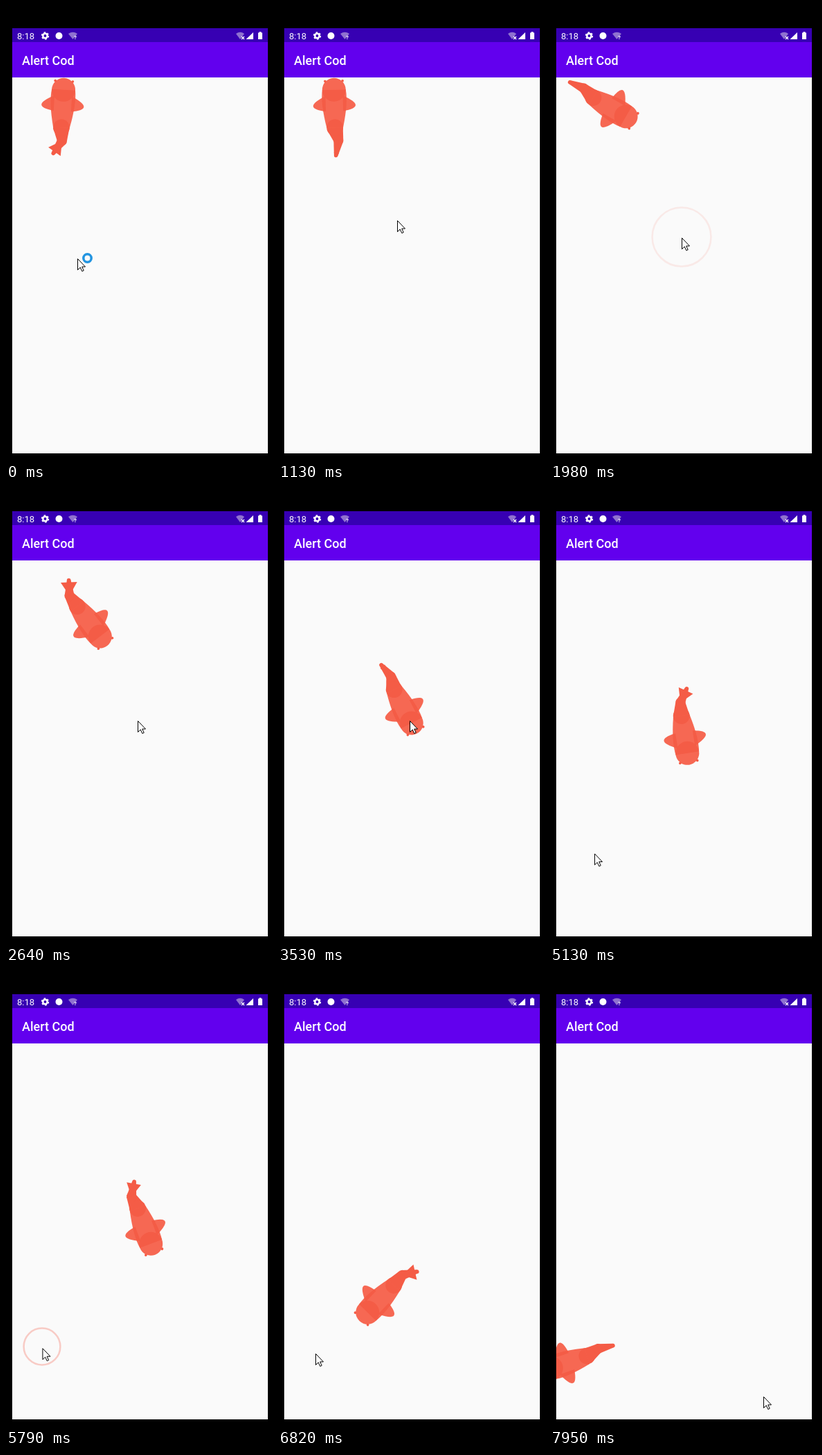
These frames come from a looping animation (384x656 px, 8 s). An HTML page with a canvas:

```html
<!DOCTYPE html>
<html lang="en">
<head>
<meta charset="utf-8">
<title>Alert Cod</title>
<style>
  html, body { margin: 0; width: 100%; height: 100%; overflow: hidden; background: #000; }
  svg, canvas { position: absolute; left: 0; top: 0; width: 384px; height: 656px; }
  text { fill: #fff; font-family: Roboto, sans-serif; }
</style>
</head>
<body>
<svg viewBox="0 0 384 656">
  <rect x="9" y="32" width="369" height="21" fill="#3700b3"/>
  <rect x="9" y="52" width="369" height="51" fill="#6200ee"/>
  <rect x="9" y="103" width="369" height="542" fill="#fafafa"/>
  <text x="16" y="48" font-size="13">8:18</text>
  <text x="23" y="85" font-size="18" font-weight="500">Alert Cod</text>
  <!-- status icons -->
  <circle cx="56.5" cy="43" r="3.2" fill="none" stroke="#fff" stroke-width="2.6"/>
  <circle cx="56.5" cy="43" r="4.9" fill="none" stroke="#fff" stroke-width="1.6" stroke-dasharray="2.6 2.53"/>
  <circle cx="76.5" cy="43" r="5" fill="#fff"/>
  <g fill="#8f72cf">
    <path d="M90 40Q96.5 35.5 103 40L96.5 48Z"/>
    <path d="M332 40Q338 35.5 344 40L338 48Z"/>
  </g>
  <text x="98" y="48" font-size="8" font-weight="700">?</text>
  <path d="M340 44l4 4m0-4l-4 4" stroke="#fff" stroke-width="1.3"/>
  <path d="M357 38V48H346.5Z" fill="#fff"/>
  <path d="M364 38.5h1.5v-1.3h3v1.3h1.5v9.5h-6Z" fill="#fff"/>
</svg>
<canvas id="stage" width="384" height="656"></canvas>
<script>
const ctx = document.getElementById('stage').getContext('2d');
const LOOP = 8000, SWIM = 3000, R = 17;
const LIGHT = '#f66853', DEEP = '#f45c46';
const rad = deg => deg * Math.PI / 180;
const clamp = x => Math.min(1, Math.max(0, x));
const ease = x => (1 - Math.cos(Math.PI * clamp(x))) / 2;

// Each tap starts a ripple and sends the fish along a cubic curve.
const REST = [194, 354];
const swims = [
  { start: 1250, tap: [190, 333], curve: [[81.5, 148], [81.5, 121], [167, 258], REST] },
  { start: 5280, tap: [52, 540], curve: [REST, [232, 409], [105, 527], [20, 566]] }
];

// Pointer moves: destination, arrival time, duration.
const HOME = [103, 364];
const moves = [
  { to: [172, 309], at: 1130, takes: 800 },
  { to: [190, 334], at: 1250, takes: 120 },
  { to: [197, 365], at: 4250, takes: 500 },
  { to: [52, 540], at: 5280, takes: 800 },
  { to: [54, 550], at: 6820, takes: 1500 },
  { to: [308, 612], at: 7800, takes: 750 }
];

const mix = (a, b, k) => a.map((v, i) => v + (b[i] - v) * k);

// Point and direction on a cubic curve, by repeated halving of its hull.
function follow(points, u) {
  let row = points;
  while (row.length > 2) row = row.slice(1).map((p, i) => mix(row[i], p, u));
  const [a, b] = row;
  return { at: mix(a, b, u), angle: Math.atan2(b[1] - a[1], b[0] - a[0]) };
}

function polygon(...points) {
  const path = new Path2D();
  points.forEach(p => path.lineTo(...p));
  path.closePath();
  return path;
}

function disc(x, y, r) {
  const path = new Path2D();
  path.arc(x, y, r, 0, 2 * Math.PI);
  return path;
}

function paint(color, ...paths) {
  ctx.fillStyle = color;
  paths.forEach(path => ctx.fill(path));
}

// Fish shapes are in head radii, facing +x around the middle of the body.
const head = disc(1.6, 0, 1);
const fins = [-1, 1].map(s =>
  new Path2D(`M1.08 ${.74 * s}Q.09 ${2.86 * s} -.22 ${.74 * s}Z`));
const body = new Path2D('M1.6 -1Q.45 -1.17 -1.6 -.7V.7Q.45 1.17 1.6 1Z');
const rump = disc(-1.6, 0, .7);
const eyes = [-1, 1].map(s => disc(2.34, .74 * s, .11));
const segment = (length, wide, thin) =>
  polygon([0, -wide], [-length, -thin], [-length, thin], [0, wide]);
const upperTail = segment(1.12, .7, .42), lowerTail = segment(1.302, .42, .168);

function drawTail(phase) {
  const bend = rad(15 * Math.cos(phase)), flick = rad(35 * Math.sin(phase));
  const spread = .7 * Math.abs(Math.sin(phase));
  ctx.save();
  ctx.translate(-1.6, 0);
  ctx.rotate(bend);
  paint(DEEP, upperTail, disc(0, 0, .7), disc(-1.12, 0, .42));
  ctx.translate(-1.12, 0);
  ctx.rotate(flick - bend);
  paint(DEEP, lowerTail, disc(-1.302, 0, .168),
    polygon([0, 0], [-1.134, -spread], [-1.134, spread]));
  ctx.restore();
}

function drawFish(t) {
  const swim = t < swims[1].start ? swims[0] : swims[1];
  const { at, angle } = follow(swim.curve, ease((t - swim.start) / SWIM));
  // the beat quickens while swimming
  const swum = swims.reduce((sum, s) => sum + SWIM * clamp((t - s.start) / SWIM), 0);
  const sway = 8 * Math.sin(rad(24 + .288 * t + .118 * swum));
  ctx.save();
  ctx.translate(...at);
  ctx.rotate(angle + rad(sway));
  ctx.scale(R, R);
  drawTail(rad(115 + .36 * t + .33 * swum));
  paint(LIGHT, head, ...fins, body);
  paint(DEEP, ...eyes);
  // overlapping parts are deeper in colour
  ctx.clip(body);
  paint(DEEP, head, ...fins, rump);
  ctx.restore();
}

function drawRipple({ start, tap }, t) {
  const k = (t - start) / 1000;
  if (k < 0 || k > 1) return;
  const grow = ease(k);
  ctx.strokeStyle = `rgba(244, 92, 71, ${.6 * (1 - grow)})`;
  ctx.lineWidth = 2.5;
  ctx.stroke(disc(...tap, 51 * grow));
}

const arrow = new Path2D('M.5 .5V16.5l3.7 -3.6 2.6 5.6 2.4 -1.1 -2.5 -5.4H11.5Z');

function drawPointer(t) {
  const tip = moves.reduce((from, { to, at, takes }) =>
    mix(from, to, ease(1 + (t - at) / takes)), HOME);
  ctx.save();
  ctx.translate(...tip);
  ctx.lineWidth = 1;
  ctx.strokeStyle = '#000';
  paint('#fff', arrow);
  ctx.stroke(arrow);
  if (t < 600) {
    ctx.lineWidth = 3.5;
    ctx.strokeStyle = '#2294e0';
    ctx.stroke(disc(14.5, -.5, 5.7));
  }
  ctx.restore();
}

function draw(t) {
  ctx.clearRect(0, 0, 384, 656);
  ctx.save();
  ctx.beginPath();
  ctx.rect(9, 103, 369, 542);
  ctx.clip();
  drawFish(t);
  swims.forEach(swim => drawRipple(swim, t));
  ctx.restore();
  drawPointer(t);
}

const begin = performance.now();
function frame() {
  draw((performance.now() - begin) % LOOP);
  requestAnimationFrame(frame);
}
frame();
</script>
</body>
</html>
```
